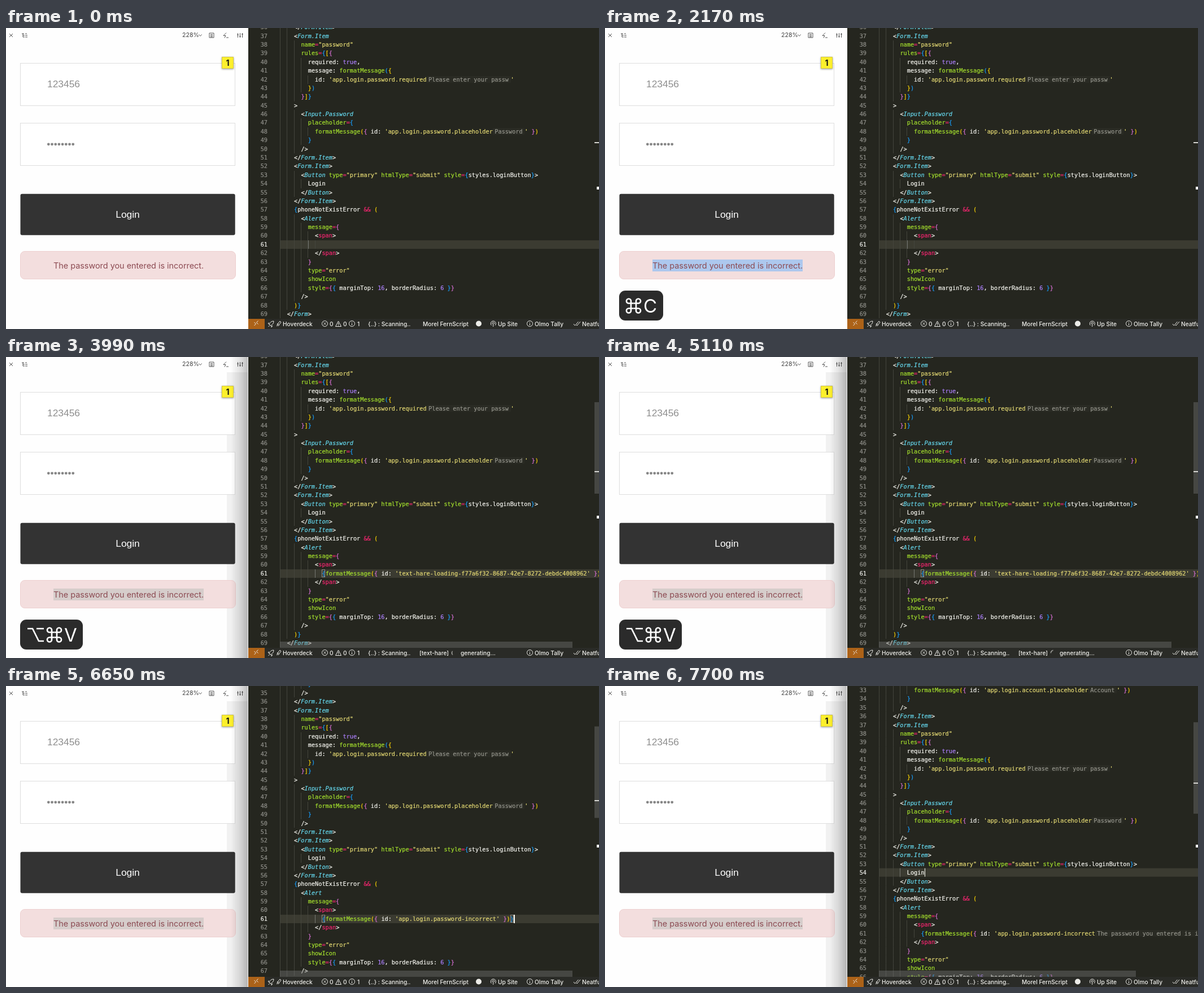
An HTML page that plays this animation: 1050x533 px, repeating every 8 s.

```html
<!DOCTYPE html>
<html lang="en">
<head>
<meta charset="utf-8">
<title>Login form and editor</title>
<style>
html, body { margin: 0; width: 100%; height: 100%; overflow: hidden; background: #fff; }
div { position: absolute; box-sizing: border-box; white-space: pre; }
#stage { width: 1050px; height: 533px; overflow: hidden; background: #fefefe; }
svg { position: absolute; left: 0; top: 0; overflow: visible; fill: none; }
.field { left: 25px; width: 381px; height: 76px; background: #fff; border: 1px solid #dedede; }
.form { font: 17.4px/24px 'Liberation Sans', Arial, sans-serif; }
.button { left: 25px; top: 293px; width: 381px; color: #fff; text-align: center; line-height: 75px; }
.alert { left: 25px; top: 395px; width: 382px; height: 50px; border-radius: 8px;
  background: #f3dede; border: 1px solid #edcfcf; }
.alertText { left: 84px; top: 408px; font: 14.4px/25px Inter, sans-serif; color: #8c4a52; }
.pick { right: 700px; top: 410px; width: 266px; height: 21px; }
.badge { left: 382px; top: 51px; width: 21px; height: 21px; background: #fdf02c; color: #111;
  border: 1px solid #d3c843; font: bold 14px/19px Inter, sans-serif; text-align: center;
  box-shadow: 0 1px 3px #0006; }
.haze { left: 391px; top: 27px; width: 37px; height: 506px; background: #0000000d; }
.shade { left: 398px; top: 0; width: 30px; height: 533px;
  background: linear-gradient(90deg, #0000, #0000001a 50%, #00000040); }
.keys { left: 25px; top: 465px; height: 53px; border-radius: 11px; background: #2b2b2b; color: #fff;
  font: 33px/54px Inter, sans-serif; }
.keys svg { stroke: #fff; stroke-width: 2.7; }
.editor { left: 429px; top: 0; width: 621px; height: 515px; overflow: hidden; background: #25261f;
  color: #f8f8f2; font: 10.265px/15.385px 'DejaVu Sans Mono', monospace; -webkit-text-stroke: .2px; }
.scroll { left: 0; top: 6.6px; width: 621px; height: 0; }
.row { height: 15.385px; }
.guides { left: 56.3px; top: 0; height: 15.4px;
  background: repeating-linear-gradient(90deg, #44453d 0 1px, #0000 1px 12.36px); }
.guide { width: 1px; height: 15px; background: #767771; }
.num { left: 0; width: 34px; text-align: right; color: #90908a; }
.current { left: 56px; width: 565px; height: 15px; background: #3b3b31; }
.inlay { color: #95958c; background: #ffffff06; padding: 0 3.5px; }
.tag { color: #66d9ef; font-style: italic; }
.op { color: #f92672; }
.name { color: #a6e22e; }
.str { color: #e6db74; }
.lit { color: #ae81ff; }
.match { width: 6px; height: 14px; border: 1px solid #8b8b84; }
.caret { width: 1.5px; height: 15px; background: #f8f8f0; }
.bar { background: #79797966; }
.mark { background: #d6d6d2; }
.status { left: 429px; top: 515px; width: 621px; height: 18px; background: #2a2b27; }
.item { top: 514px; color: #f2f2ee; font: 500 10.2px/20px Inter, sans-serif; }
.spinner { left: 789px; top: 519px; width: 10px; height: 10px; border-radius: 50%;
  border: 1px solid #0000; border-left-color: #f2f2ee; }
.zoom { left: 312px; top: 3px; font: 10.6px/20px Inter, sans-serif; color: #444; }
</style>
</head>
<body>
<div id="stage"></div>
<script>
const LOOP = 8000, CHAR = 6.18, PITCH = 15.385, FIRST = 37;
const T = { drag: 980, copy: 2170, focus: 2730, hover: 2870, press: 3220, paste: 3290,
  release: 5460, done: 6090, ready: 6230, scroll: 6510, narrow: 7210, click: 7560, hint: 7630 };
const stage = document.getElementById('stage');

function add(parent, cls, text = '', css = {}) {
  const node = document.createElement('div');
  node.className = cls;
  node.textContent = text;
  for (const k in css) node.style[k] = typeof css[k] === 'number' ? css[k] + 'px' : css[k];
  parent.appendChild(node);
  return node;
}

function svg(parent, markup) {
  parent.insertAdjacentHTML('beforeend', `<svg>${markup}</svg>`);
  return parent.lastElementChild;
}

// Hard changes: each [time, value] holds until the next one.
function jump(node, prop, steps) {
  const frames = steps.map(([t, v]) => ({ [prop]: v, offset: t / LOOP, easing: 'step-end' }));
  frames.push({ [prop]: steps[steps.length - 1][1], offset: 1 });
  node.animate(frames, { duration: LOOP, iterations: Infinity });
}

function show(node, from, to = LOOP) {
  const steps = from ? [[0, 0], [from, 1]] : [[0, 1]];
  if (to < LOOP) steps.push([to, 0]);
  jump(node, 'opacity', steps);
  return node;
}

// ---- form panel ----
show(add(stage, 'haze'), T.focus);
add(stage, 'field', '', { top: 62 });
add(stage, 'field', '', { top: 168 });
add(stage, 'form', '123456', { left: 73, top: 87, color: '#8e8e8e' });
svg(stage, '<rect x="25.500" y="293.700" width="380.200" height="73" rx="3" fill="#333"/>');
add(stage, 'form button', 'Login');
add(stage, 'alert');
const dragged = show(add(stage, 'pick', '', { background: '#adc8ee' }), T.drag, T.focus);
jump(dragged, 'width', [[0, '0px'], ...Array.from({ length: 11 }, (_, i) =>
  [T.drag + 70 * i, Math.max(4, 26.6 * i) + 'px'])]);
show(add(stage, 'pick', '', { background: '#d6cdcb' }), T.focus);
add(stage, 'alertText', 'The password you entered is incorrect.');
add(stage, 'badge', '1');
add(stage, 'zoom', '228%');
const dots = Array.from({ length: 8 }, (_, i) =>
  `<circle cx="${75.3 + i * 6.2}" cy="205.8" r="2.4"/>`).join('');
svg(stage, `<g fill="#868686">${dots}</g>
  <path stroke="#555" d="M6 10l6 6m0-6l-6 6M28 10h4M30 10v6h3M30 13h3M34 13h4M34 16h4M34 10h3
  M341.500 11.500l2.700 2.700 2.700-2.700M360 9h8v8h-8zM362 11.500h4M362 13.500h4M362 15.500h4
  M390 8.500l-5 5h4l-2 4M390 17h4M410.500 9v8M414.500 9v8M418.500 9v8M409 12h3M413 15h3M417 11h3"/>`);
show(add(stage, 'shade'), T.focus);

// ---- pressed keys ----
const loop = 'M9 13.500V5A4 4 0 1 0 5 9H13.500';
const command = [0, 90, 180, 270].map(a =>
  `<path d="${loop}" transform="rotate(${a} 13.500 13.500)"/>`).join('');
function keys(width, letter, x, draw) {
  const box = add(stage, 'keys', '', { width });
  svg(box, draw);
  add(box, '', letter, { left: x, top: 0 });
  return box;
}
show(keys(78, 'C', 43, `<g transform="translate(12 13.500)">${command}</g>`), T.copy, T.press);
show(keys(111, 'V', 78, `<path d="M13 16h9l11 22h9M29 16h13"/>
  <g transform="translate(47 13.500)">${command}</g>`), T.press, T.release);

// ---- code ----
const CODE = [
  [10, "formatMessage({ id: 'app.login.account.placeholder«Account»' })"],
  [8, '}'], [6, '/>'], [4, '</Form.Item>'], [4, '<Form.Item'],
  [6, 'name="password"'], [6, 'rules={[{'], [8, 'required: true,'],
  [8, 'message: formatMessage({'],
  [10, "id: 'app.login.password.required«Please enter your passw»'"],
  [8, '})'], [6, '}]}'], [4, '>'], [6, '<Input.Password'], [8, 'placeholder={'],
  [10, "formatMessage({ id: 'app.login.password.placeholder«Password»' })"],
  [8, '}'], [6, '/>'], [4, '</Form.Item>'], [4, '<Form.Item>'],
  [6, '<Button type="primary" htmlType="submit" style={styles.loginButton}>'],
  [8, 'Login'], [6, '</Button>'], [4, '</Form.Item>'],
  [4, '{phoneNotExistError && ('], [6, '<Alert'], [8, 'message={'], [10, '<span>'],
  [12, ''], [10, '</span>'], [8, '}'], [8, 'type="error"'], [8, 'showIcon'],
  [8, 'style={{ marginTop: 16, borderRadius: 6 }}'], [6, '/>'], [4, ')}'], [2, '</Form>']
];
const TOKEN = /«[^»]*»|'[\w.-]*'?|"[^"]*"|<\/?[\w.]+|&&|[(){}[\]]|\w+|[^\w]/g;
const GREEN = /^(formatMessage|showIcon|name|rules|message|placeholder|type|htmlType|style)$/;
const PAIRS = ['#ffd700', '#da70d6', '#179fff'];
let depth = 3;

function span(parent, cls, text, color = '') {
  const node = document.createElement('span');
  node.className = cls;
  node.textContent = text;
  node.style.color = color;
  parent.appendChild(node);
}

function paint(row, text) {
  for (const tok of text.match(TOKEN) || []) {
    if (tok[0] === '«') span(row, 'inlay', tok.slice(1, -1));
    else if (/^['"]/.test(tok)) span(row, 'str', tok);
    else if (/^<\/?\w/.test(tok)) {
      const [, open, tag] = tok.match(/(<\/?)(.+)/);
      span(row, '', open);
      span(row, tag === 'span' ? 'op' : 'tag', tag);
    }
    else if (/^(&&|=)$/.test(tok)) span(row, 'op', tok);
    else if (/[({[]/.test(tok)) span(row, '', tok, PAIRS[depth++ % 3]);
    else if (/[)}\]]/.test(tok)) span(row, '', tok, PAIRS[--depth % 3]);
    else if (/^(true|\d+)$/.test(tok)) span(row, 'lit', tok);
    else if (GREEN.test(tok) && !text.includes(tok + ':')) span(row, 'name', tok);
    else span(row, '', tok);
  }
}

const editor = add(stage, 'editor');
const scroll = add(editor, 'scroll');
const lineTop = n => (n - FIRST) * PITCH;
const colLeft = c => 56.3 + c * CHAR;
const at = (cls, n, col) => add(scroll, cls, '', { left: colLeft(col), top: lineTop(n) });
const codeRow = (n, indent, text) => {
  const row = at('row', n, indent);
  paint(row, text);
  return row;
};

show(add(scroll, 'current', '', { top: lineTop(61) }), 0, T.click);
show(add(scroll, 'current', '', { top: lineTop(54) }), T.click);

CODE.forEach(([indent, text], i) => {
  const n = 33 + i;
  add(scroll, 'guides', '', { top: lineTop(n), width: indent * CHAR - 1 });
  const num = add(scroll, 'num', n, { top: lineTop(n) });
  if (n === 61) jump(num, 'color', [[0, '#eeeeea'], [T.click, '#90908a']]);
  if (n === 54) jump(num, 'color', [[0, '#90908a'], [T.click, '#eeeeea']]);
  codeRow(n, indent, text);
  if (n === 61) {
    const call = id => `{formatMessage({ id: '${id}' })}`;
    const key = 'app.login.password-incorrect';
    show(codeRow(n, indent, call('text-hare-loading-f77a6f32-8687-42e7-8272-debdc4008962')), T.paste, T.done);
    show(codeRow(n, indent, call(key)), T.done, T.hint);
    show(codeRow(n, indent, call(key + '«The password you entered is incorrect.»')), T.hint);
  }
});

show(at('guide', 61, 8), 0, T.paste);
show(at('guide', 61, 10), T.paste, T.click);
show(at('guide', 54, 6), T.click);
show(at('match', 61, 12), T.paste, T.click);
show(at('match', 61, 66), T.done, T.click);
show(at('caret', 61, 67), T.done, 6790);
show(at('caret', 54, 13), T.click);

const SHIFT = [0, 10, 29, 46, 54, 56.4, 55.8, 55.2, 54.7];
const shiftBy = (node, rate) => jump(node, 'transform',
  SHIFT.map((y, i) => [i && T.scroll + 70 * i, `translateY(${y * rate}px)`]));
shiftBy(scroll, 1);

// ---- scrollbars and overview marks ----
shiftBy(show(add(editor, 'bar', '', { left: 613, top: 80, width: 8, height: 162 }), T.hover), -.29);
const track = show(add(editor, 'bar', '', { left: 56, top: 504, width: 518, height: 11 }), T.paste);
jump(track, 'width', [[0, '518px'], [T.narrow, '486px'], [T.narrow + 70, '455px']]);
const here = add(editor, 'mark', '', { left: 613, top: 202, width: 8, height: 2 });
jump(here, 'top', [[0, '202px'], [T.click, '171px']]);
add(editor, 'mark', '', { left: 617, top: 281, width: 4, height: 5, background: '#fff' });

// ---- status bar ----
add(stage, 'status');
add(stage, 'status', '', { width: 29, background: '#ac6218' });
const item = (x, text) => add(stage, 'item', text, { left: x });
const line = d => svg(stage, `<path stroke="#ecece8" d="${d}"/>`);
const ring = (x, y) => `M${x - 5} ${y}a5 5 0 1 0 10 0a5 5 0 1 0-10 0`;

item(490, 'Hoverdeck');
item(573, '0');
item(597, '0');
item(622, '1');
item(641, '{..} : Scanning..');
item(936, 'Olmo Tally');
item(1020, 'Neatful');
line('M439.500 521l3 3-3 3M446.500 518.500l-3 3 3 3');
line('M466 525q2-6 8-6q0 6-6 8zM466 522l-2 1 2 2M470 527l0 3 2-3M464.500 529l2-2');
line('M479 528l3-3M481 523l3 3q-3 3-4 0zM482 523l3-4 2 2-3 4');
line(ring(564.5, 523.5) + 'M562.500 521.500l4 4m0-4l-4 4');
line('M588.500 519l5 9.500h-10zM588.500 522v3.500M588.500 526.500v1');
for (const x of [612.5, 927.5]) line(ring(x, 523.5) + `M${x} 523v3.500M${x} 520.500v1.200`);
line('M1005 524l2.500 3 6-7M1010 526l1 1 6-7');

// Right-hand items give way to the progress message.
const idle = [
  item(738, 'Morel FernScript'),
  item(871, 'Up Site'),
  svg(stage, '<circle cx="837" cy="523.500" r="5" fill="#ecece8"/>'),
  line('M859.500 526.500a4.500 4.500 0 1 1 6.500 0M861 524a2 2 0 1 1 3.500 0M862.700 523v6')
];
const spinner = add(stage, 'spinner');
const busy = [item(732, '[text-hare]'), item(805, 'generating...'), spinner];
idle.forEach(n => jump(n, 'opacity', [[0, 1], [T.paste, 0], [T.ready, 1]]));
busy.forEach(n => show(n, T.paste, T.ready));
spinner.animate({ transform: ['rotate(0deg)', 'rotate(360deg)'] }, { duration: 1000, iterations: Infinity });
</script>
</body>
</html>
```
